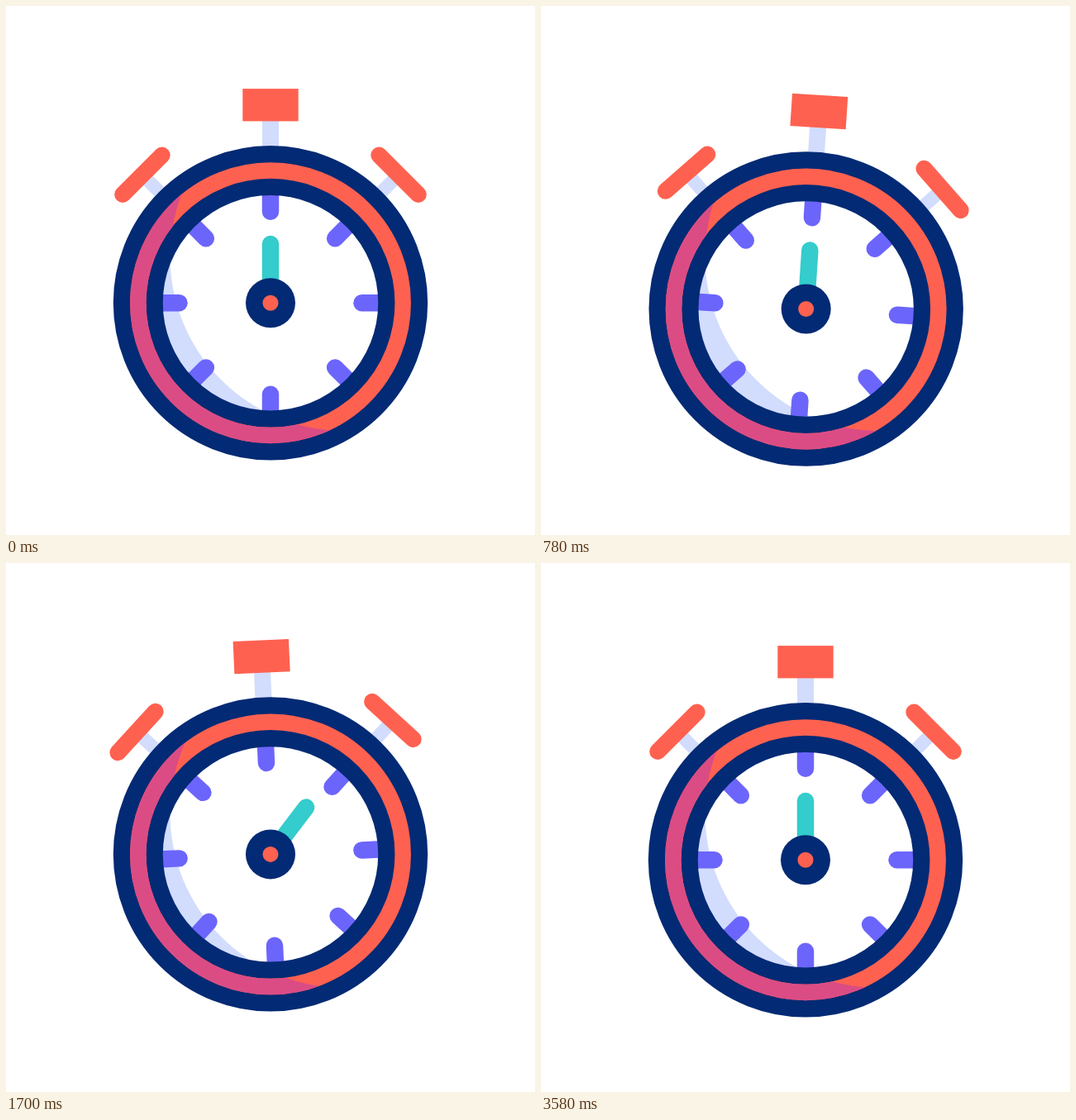
An HTML page with a canvas that plays this animation: 640 px wide and 640 px high, repeating every 3.6 s.

```html
<!DOCTYPE html>
<html lang="en">
<head>
<meta charset="utf-8">
<title>Stopwatch</title>
<style>
  html, body { margin: 0; width: 100%; height: 100%; overflow: hidden; background: #fff; }
  canvas { display: block; }
</style>
</head>
<body>
<canvas id="stage" width="640" height="640"></canvas>
<script>
const ctx = document.getElementById('stage').getContext('2d');
const NAVY = '#032a74', CORAL = '#ff6150', PALE = '#d2dcfd',
      VIOLET = '#6c65fb', TEAL = '#34cccc', PINK = '#db4c85';
const LOOP = 3600, RAD = Math.PI / 180;

const bezier = (s, a, b, c, d) => {
  const r = 1 - s;
  return r * r * r * a + 3 * r * r * s * b + 3 * r * s * s * c + s * s * s * d;
};

// Eased progress from start to end, like cubic-bezier(x1, 0, x2, 1).
function ease(t, start, end, x1 = 1 / 3, x2 = 2 / 3) {
  const x = Math.min(1, Math.max(0, (t - start) / (end - start)));
  let lo = 0, hi = 1;
  for (let i = 0; i < 24; i++) {
    const mid = (lo + hi) / 2;
    if (bezier(mid, 0, x1, x2, 1) < x) lo = mid; else hi = mid;
  }
  return bezier(lo, 0, 0, 1, 1);
}

function pose(t) {
  const tilt = ease(t, 100, 600);
  const swing = ease(t, 600, 1080);
  const settle = ease(t, 1100, 2160, 0.3, 0.5);
  return {
    x: 320 + tilt - swing,
    y: 359.3 + bezier(tilt, 0, 4, 30.5, 22.1) - 46.5 * swing + 24.4 * settle,
    angle: 9.8 * tilt - 18.95 * swing + 9.15 * settle,
    hand: 378 * ease(t, 1560, 2260) - 18 * ease(t, 2260, 3020)
  };
}

function disc(r, color) {
  ctx.fillStyle = color;
  ctx.beginPath();
  ctx.arc(0, 0, r, 0, 7);
  ctx.fill();
}

function ring(r, width, color) {
  ctx.strokeStyle = color;
  ctx.lineWidth = width;
  ctx.beginPath();
  ctx.arc(0, 0, r, 0, 7);
  ctx.stroke();
}

function line(x1, y1, x2, y2, width, color, cap = 'round') {
  ctx.strokeStyle = color;
  ctx.lineWidth = width;
  ctx.lineCap = cap;
  ctx.beginPath();
  ctx.moveTo(x1, y1);
  ctx.lineTo(x2, y2);
  ctx.stroke();
}

function rotated(degrees, paint) {
  ctx.save();
  ctx.rotate(degrees * RAD);
  paint();
  ctx.restore();
}

// The light stays at a fixed place on the stage; shade lies outside it.
function shaded(p, paint) {
  ctx.save();
  ctx.beginPath();
  ctx.rect(-400, -400, 800, 800);
  ctx.arc(409.4 - p.x, 303.1 - p.y, 210.9, 0, 7);
  ctx.clip('evenodd');
  paint();
  ctx.restore();
}

function draw(t) {
  const p = pose(t);
  ctx.setTransform(1, 0, 0, 1, 0, 0);
  ctx.fillStyle = '#fff';
  ctx.fillRect(0, 0, 640, 640);
  ctx.translate(p.x, p.y);

  for (const side of [-45, 45]) {
    rotated(p.angle + side, () => {
      line(0, -180, 0, -219, 16, PALE, 'butt');
      line(-33.6, -219.3, 33.6, -219.3, 20, CORAL);
    });
  }
  rotated(p.angle, () => {
    line(0, -180, 0, -225, 20, PALE, 'butt');
    ctx.fillStyle = CORAL;
    ctx.fillRect(-33.7, -259.2, 67.4, 39.3);
  });

  disc(140, '#fff');
  shaded(p, () => disc(140, PALE));
  for (let i = 0; i < 8; i++) {
    rotated(p.angle + i * 45, () => line(0, -110.5, 0, -135, 20.5, VIOLET));
  }
  ring(160.2, 60, NAVY);
  ring(160.2, 19.5, CORAL);
  shaded(p, () => ring(160.2, 19.5, PINK));

  rotated(p.angle + p.hand, () => line(0, 0, 0, -71.3, 20.5, TEAL));
  disc(30, NAVY);
  disc(9.5, CORAL);
}

const begin = performance.now();
function frame() {
  draw((performance.now() - begin) % LOOP);
  requestAnimationFrame(frame);
}
frame();
</script>
</body>
</html>
```
